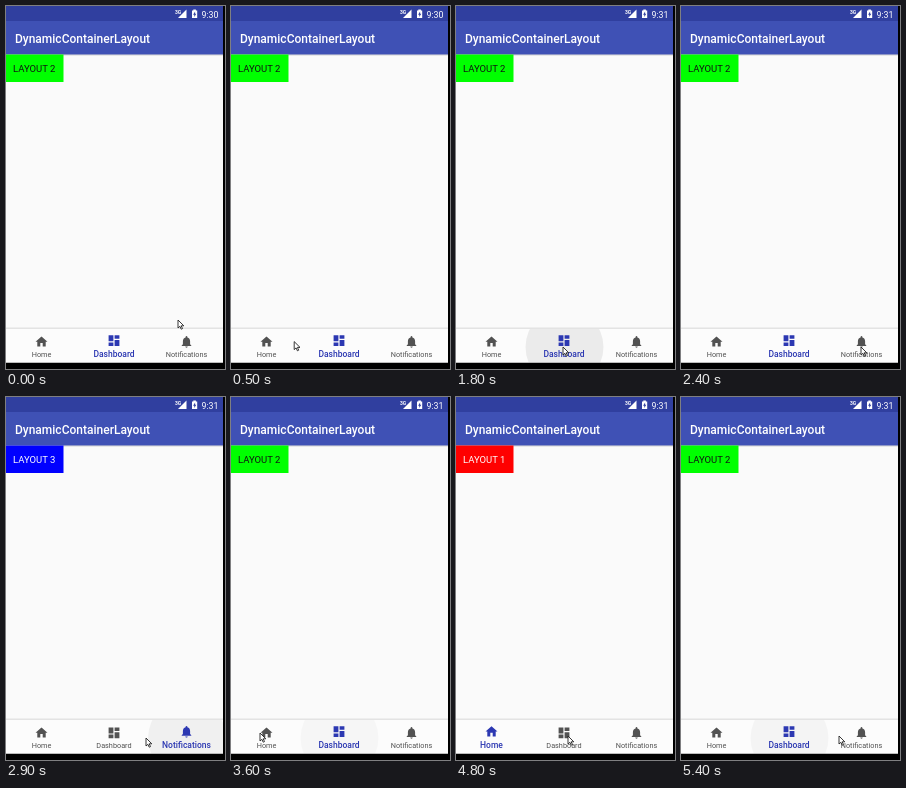
Recreate the animation shown at these times as an HTML page. Size 219 by 363 pixels, loop 5500 ms.

```html
<!DOCTYPE html>
<html lang="en">
<head>
<meta charset="utf-8">
<title>Bottom navigation</title>
<style>
  html, body { margin: 0; width: 100%; height: 100%; overflow: hidden; background: #000; }
  svg { display: block; width: 219px; height: 363px; font-family: Roboto, sans-serif; }
  .tab { fill: #525252; font-size: 7.3px; text-anchor: middle; }
  .tab.on { fill: #2c38b2; font-size: 8.5px; font-weight: 500; }
  .tab.on path { transform: translateY(-2px); }
</style>
</head>
<body>
<svg viewBox="0 0 219 363">
  <defs>
    <clipPath id="bar"><rect y="323" width="217" height="33.5"/></clipPath>
    <linearGradient id="shade" x2="0" y2="1">
      <stop offset="0" stop-color="#000" stop-opacity=".16"/>
      <stop offset="1" stop-color="#000" stop-opacity="0"/>
    </linearGradient>
  </defs>
  <rect width="219" height="363"/>
  <rect width="217" height="356.5" fill="#fafafa"/>
  <rect width="217" height="15" fill="#303f9f"/>
  <rect y="15" width="217" height="33.5" fill="#3f51b5"/>
  <rect y="48.5" width="217" height="2" fill="url(#shade)"/>

  <g fill="#fff">
    <path d="M180.5 3.5V12H172z"/>
    <text x="169" y="7.6" font-size="5" font-weight="700">3G</text>
    <path d="M187.3 3.5h2.6v1h1.3V12h-5.2V4.500h1.300z"/>
    <path d="M189.100 5.500l-2 3.200h1.200v2.300l2-3.300h-1.200z" fill="#303f9f"/>
    <text id="clock" x="195.500" y="11.500" font-size="8.800"></text>
    <text x="9" y="37" font-size="12" font-weight="500">DynamicContainerLayout</text>
  </g>

  <rect id="panel" y="48.500" width="57.500" height="27.500"/>
  <text id="label" x="7" y="66" font-size="9.500"></text>

  <rect y="321.500" width="217" height="1.500" fill="#e3e3e3"/>
  <rect y="323" width="217" height="33.500" fill="#fcfcfc"/>
  <g clip-path="url(#bar)"><circle id="ripple" cy="341"/></g>
  <g id="tabs"></g>
  <path id="cursor" d="M0 0V8L1.900 6.300 3.200 9.200 4.500 8.600 3.200 5.800H5.800Z"
        fill="#fff" stroke="#222" stroke-width=".9" stroke-linejoin="round"/>
</svg>
<script>
const LOOP = 5500, STEP = 100;
const $ = id => document.getElementById(id);

const TABS = [
  { name: 'Home', x: 35.5, fill: '#f00', ink: '#fff',
    icon: 'M10 20v-6h4v6h5v-8h3L12 3 2 12h3v8z' },
  { name: 'Dashboard', x: 108, fill: '#0f0', ink: '#111',
    icon: 'M3 13h8V3H3zm0 8h8v-6H3zm10 0h8V11h-8zm0-18v6h8V3z' },
  { name: 'Notifications', x: 180.5, fill: '#00f', ink: '#fff',
    icon: 'M12 22c1.1 0 2-.9 2-2h-4c0 1.100.890 2 2 2zm6-6v-5c0-3.070-1.640-5.640-4.500-6.320V4' +
      'c0-.830-.670-1.500-1.500-1.500s-1.500.670-1.500 1.500v.680C7.630 5.360 6 7.920 6 11v5l-2 2v1h16v-1z' }
];

// Press time and tab index
const PRESSES = [[760, 0], [1440, 1], [2440, 2], [3040, 1], [3840, 0], [4880, 1]];

// Pointer stops: time, x, y
const STOPS = [
  [0, 172, 314], [100, 172, 314], [600, 36, 341], [1000, 36, 341],
  [1400, 107, 341], [1800, 107, 341], [2300, 180, 341], [2650, 180, 341],
  [2900, 140, 341], [3050, 108, 341], [3200, 107, 341], [3600, 29, 336],
  [3800, 35, 341], [4300, 36, 341], [4800, 112, 339], [5100, 112, 339], [5400, 158, 339]
];

$('tabs').innerHTML = TABS.map(({ name, x, icon }) => `
  <g class="tab">
    <g transform="translate(${x - 7.2} 328.6) scale(.6)"><path d="${icon}"/></g>
    <text x="${x}" y="351">${name}</text>
  </g>`).join('');
const tabs = [...$('tabs').children];

const clamp = v => Math.min(1, Math.max(0, v));

function set(id, attrs) {
  for (const key in attrs) $(id).setAttribute(key, attrs[key]);
}

function pointer(t) {
  const i = STOPS.findIndex(s => s[0] > t);
  if (i < 0) return STOPS[STOPS.length - 1].slice(1);
  const [t0, x0, y0] = STOPS[i - 1], [t1, x1, y1] = STOPS[i];
  const p = (t - t0) / (t1 - t0);
  return [x0 + (x1 - x0) * p, y0 + (y1 - y0) * p];
}

function draw(t) {
  let active = 1, ripple = { r: 0 };
  for (const [start, tab] of PRESSES) {
    const age = t - start;
    if (age < 0) break;
    if (age >= 100) active = tab;
    ripple = {
      cx: TABS[tab].x + .5,
      r: 39 * (1 - (1 - clamp(age / 350)) ** 2),
      'fill-opacity': .065 * (1 - clamp((age - 380) / 280))
    };
  }
  const { fill, ink } = TABS[active];
  set('ripple', ripple);
  set('panel', { fill });
  set('label', { fill: ink });
  set('cursor', { transform: `translate(${pointer(t)})` });
  $('label').textContent = `LAYOUT ${active + 1}`;
  $('clock').textContent = t < 1300 ? '9:30' : '9:31';
  tabs.forEach((tab, i) => tab.classList.toggle('on', i === active));
}

const origin = performance.now();
function tick() {
  const t = (performance.now() - origin) % LOOP;
  draw(Math.floor(t / STEP) * STEP);
  requestAnimationFrame(tick);
}
tick();
</script>
</body>
</html>
```
